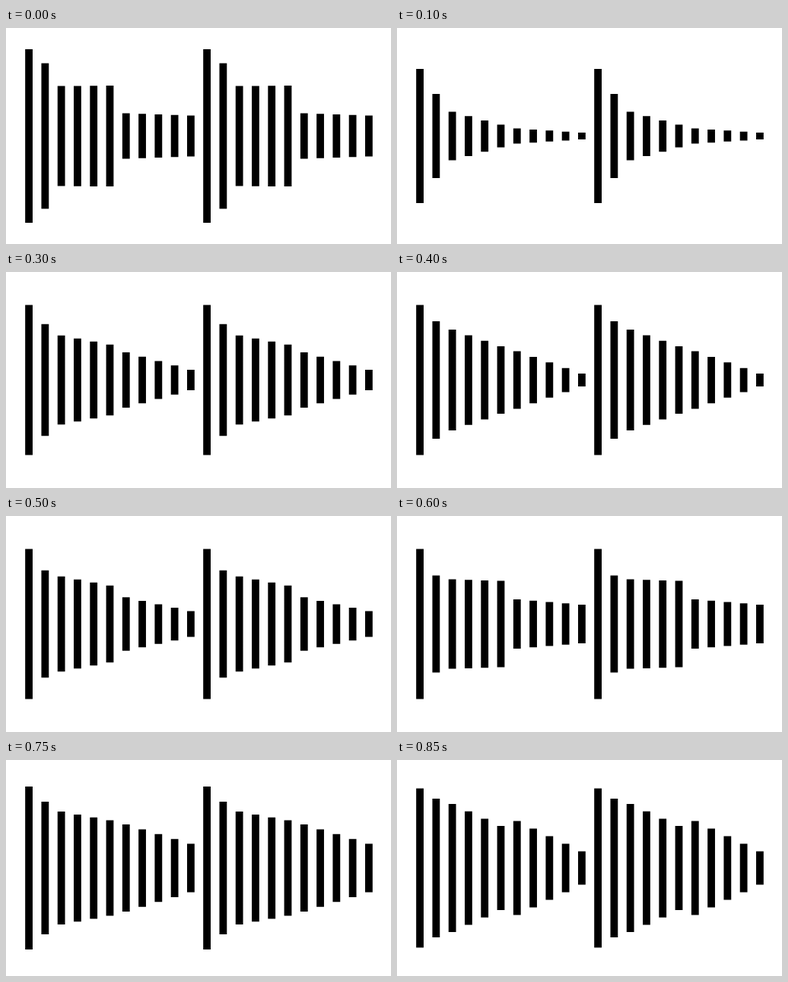
An HTML page that plays this animation: 506 by 285 pixels, repeating every 0.9 s.

```html
<!DOCTYPE html>
<html lang="en">
<head>
<meta charset="utf-8">
<title>Equalizer bars</title>
<style>
  html, body { margin: 0; width: 100%; height: 100%; overflow: hidden; background: #fff; }
  svg { display: block; width: 100vw; height: 100vh; }
</style>
</head>
<body>
<svg viewBox="0 0 506 285"><path id="bars"/></svg>
<script>
const LOOP = 900, STEP = 50;
const LEFT = 25.2, PITCH = 21.28, GROUP = 234, WIDTH = 9.8, MID = 142.6;
const BARS = 11;

// Each pose is an envelope through a few knots: time, then height at each knot.
const knots = [0, 1, 2, 5, 6, 10];
const poses = [
  [0,   [229, 192, 132, 133, 60, 54]],
  [100, [177, 111, 64, 30, 20, 9]],
  [200, [198, 140, 102, 98, 70, 37]],
  [400, [198, 155, 133, 89, 76, 17]],
  [600, [198, 128, 118, 114, 65, 51]],
  [750, [215, 175, 149, 126, 115, 64]],
  [850, [210, 183, 169, 111, 124, 44]]
];
const path = document.getElementById("bars");

const mix = (a, b, p) => a + (b - a) * p;

// Position of x in a rising list: index of its segment and progress within it.
function locate(list, x) {
  let i = 0;
  while (i < list.length - 2 && x >= list[i + 1]) i++;
  return [i, (x - list[i]) / (list[i + 1] - list[i])];
}

function envelope(heights, bar) {
  const [i, p] = locate(knots, bar);
  return mix(heights[i], heights[i + 1], p);
}

function barPath(x, h) {
  return `M${x} ${MID - h / 2}h${WIDTH}v${h}h${-WIDTH}z`;
}

function draw(now) {
  const t = Math.floor((now % LOOP) / STEP) * STEP;
  const [i, p] = locate(poses.map(pose => pose[0]), t);
  let d = "";
  for (let bar = 0; bar < BARS; bar++) {
    const h = mix(envelope(poses[i][1], bar), envelope(poses[i + 1][1], bar), p);
    const x = LEFT + bar * PITCH;
    d += barPath(x, h) + barPath(x + GROUP, h);
  }
  path.setAttribute("d", d);
}

const began = performance.now();
function tick() {
  draw(performance.now() - began);
  requestAnimationFrame(tick);
}
tick();
</script>
</body>
</html>
```
